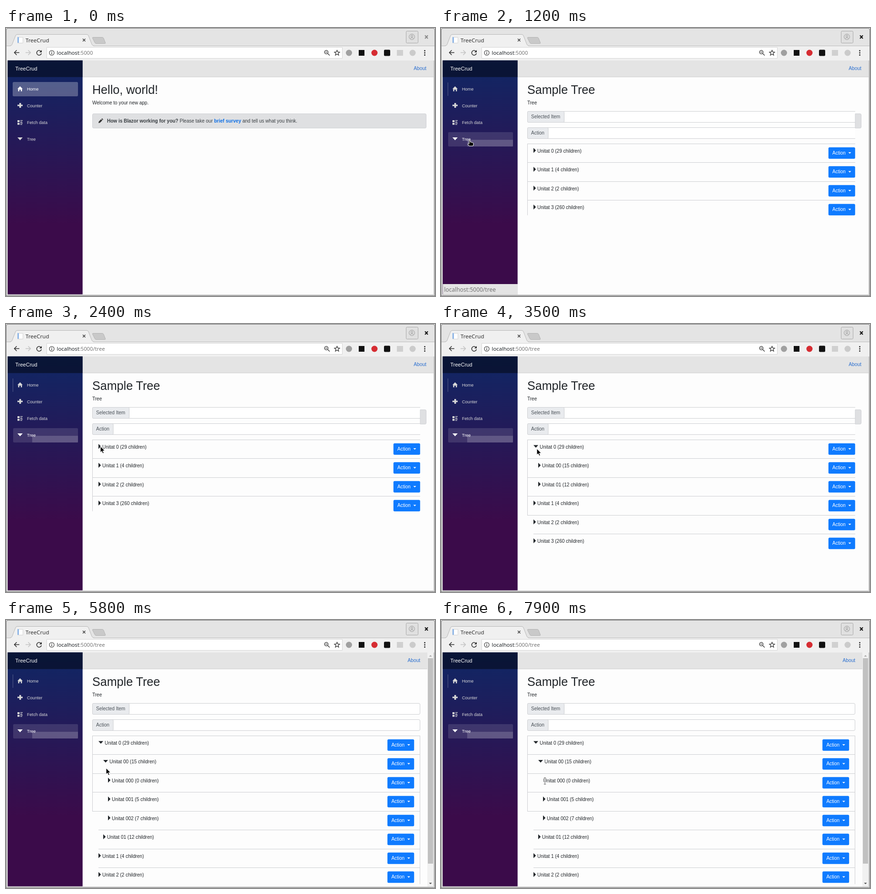
Recreate the animation shown at these times as an HTML page. Size 900 by 561 pixels, loop 8 s.

```html
<!DOCTYPE html>
<html lang="en">
<head>
<meta charset="utf-8">
<title>TreeCrud</title>
<style>
  html, body { margin: 0; width: 100%; height: 100%; overflow: hidden; background: #e4e4e4; }
  svg { display: block; width: 100%; height: 100%; }
  text { font: 10px "Liberation Sans", Arial, sans-serif; fill: #212529; white-space: pre; }
  .ui { font-family: "Noto Sans", sans-serif; }
  .h1 { font-size: 25.1px; }
  .nav { font-size: 9.1px; fill: #d7d7d7; }
  .on { fill: #fff; }
  .line { fill: none; stroke: #ced0d3; }
  .icon { fill: none; stroke: #333; stroke-width: 1.5; }
</style>
</head>
<body>
<svg viewBox="0 0 900 561">
  <defs>
    <linearGradient id="night" x2="0" y2="1">
      <stop stop-color="#0f2765"/><stop offset=".7" stop-color="#3b0b4a"/>
    </linearGradient>
    <clipPath id="narrow"><path d="M161 68H869V558H161Z"/></clipPath>
    <clipPath id="wide"><path d="M161 68H897V557H161Z"/></clipPath>
  </defs>

  <!-- window frame, tab and toolbar -->
  <path fill="#e4e4e4" d="M0 0H900V561H0Z"/>
  <path fill="#f0f0f0" d="M1 37H899V68H1Z"/>
  <path stroke="#bdbdbd" d="M1 37.5H899"/>
  <path fill="#f0f0f0" stroke="#b8b8b8" d="M8 37.5Q12 37 13 34L20 16Q21 13.500 24 13.500H169Q172 13.500 173 16L180 34Q181 37 185 37.500"/>
  <path stroke="#f0f0f0" stroke-width="2" d="M10 38H183"/>
  <path fill="#c9c9c9" stroke="#b4b4b4" d="M183 19.500H202Q204 19.500 205 22L208.500 31Q209 32.500 207 32.500H189Q187 32.500 186 30L181.500 21Q181 19.500 183 19.500Z"/>
  <path fill="#fff" stroke="#d4d4d4" d="M24.500 19.500H35.500V31.500H24.500Z"/>
  <path fill="#8fb6e6" d="M24 19H27V31H24Z"/>
  <text class="ui" x="41" y="29.500" style="font-size:11.5px;fill:#333">TreeCrud</text>
  <path class="icon" style="stroke-width:1.2" d="M161 22.500L166.500 28M166.500 22.500L161 28"/>
  <rect x="839.500" y="6.500" width="25" height="25" rx="2" fill="#e0e0e0" stroke="#aaa"/>
  <g fill="none" stroke="#999"><circle cx="851.500" cy="18.500" r="5.800"/><circle cx="851.500" cy="17" r="2"/><path d="M848 22Q851.500 18.500 855 22"/></g>
  <path id="close" stroke-width="2" d="M879 15.500L885 22M885 15.500L879 22"/>

  <path class="icon" d="M28 51.500H18M22.500 46.500L17.500 51.500L22.500 56.500"/>
  <path class="icon" style="stroke:#c4c4c4" d="M41 51.500H51M46.500 46.500L51.500 51.500L46.500 56.500"/>
  <path class="icon" d="M73.500 49A5 5 0 1 0 74.300 53"/><path fill="#333" d="M75 46V51H70Z"/>
  <path fill="#fff" stroke="#d6d6d6" d="M85.500 40.500H705.500V63.500H85.500Z"/>
  <circle class="icon" cx="96" cy="52" r="5" style="stroke-width:1.1"/>
  <path class="icon" d="M96 51V55M96 48.500V50" style="stroke-width:1.3"/>
  <text class="ui" x="106.500" y="56" style="font-size:11.2px">localhost<tspan id="url" fill="#777"></tspan></text>
  <circle class="icon" cx="672" cy="50.500" r="3.700" style="stroke-width:1.3"/>
  <path class="icon" d="M675 53.500L679 57.500M670 50.500H674" style="stroke-width:1.2"/>
  <path class="icon" style="stroke-width:1.2" d="M694.500 46.500L696.100 50.200L700 50.500L697 53L698 57L694.500 54.800L691 57L692 53L689 50.500L692.900 50.200Z"/>
  <circle cx="719.500" cy="52" r="6.500" fill="#a0a0a0"/>
  <path fill="#111" d="M740 46H752V58H740Z"/>
  <circle cx="773" cy="52" r="6.500" fill="#d62c32"/>
  <rect x="793" y="45.500" width="13" height="13" rx="2" fill="#111"/>
  <path fill="#d0d0d0" d="M820 46H833V58H820Z"/>
  <circle cx="853" cy="52" r="6.500" fill="#cbcbcb"/>
  <g fill="#333"><circle cx="878.500" cy="47.500" r="1.500"/><circle cx="878.500" cy="52" r="1.500"/><circle cx="878.500" cy="56.500" r="1.500"/></g>

  <!-- page background and sidebar -->
  <path fill="#fdfdfd" d="M160 68H897V558H160Z"/>
  <path fill="#e4e4e4" d="M160 68H897V102H160Z"/>
  <path stroke="#d2d2d2" d="M160 102.500H897"/>
  <path fill="none" stroke="#bbb" d="M3.500 68V558.500H897.500V68"/>
  <path fill="url(#night)" d="M3.600 67.700H160.700V557.600H3.600Z"/>
  <path fill="#000" fill-opacity=".46" d="M3.600 67.700H160.700V102.700H3.600Z"/>
  <text x="19.500" y="89" style="font-size:11px;fill:#fff">TreeCrud</text>
  <g id="page"></g>
  <path fill="none" stroke="#777" d="M.5 561V4Q.5 .5 4 .5H896Q899.500 .5 899.500 4V561M0 560.500H900"/>
  <g id="cursor" stroke="#fff" stroke-linejoin="round"><path/></g>
</svg>

<script>
const LOOP = 8000, STEP = 100;
const HOVER = 800, OPEN_TREE = 1100, NEW_URL = 1500, LEAVE = 2400;
const EXPAND_ROOT = 2800, EXPAND_CHILD = 4700, MARK_LEAF = 7500, TEXT_CURSOR = 7900;

const $ = id => document.getElementById(id);
const text = (x, y, content, attrs = '') => `<text x="${x}" y="${y}" ${attrs}>${content}</text>`;
const box = (x, y, w, h, attrs) => `<rect x="${x}" y="${y}" width="${w}" height="${h}" ${attrs}/>`;
const path = (d, attrs) => `<path d="${d}" ${attrs}/>`;

const NAV = [
  ['Home', 'M29.500 122L35 127.500H33.500V132.500H31V129H28V132.500H25.500V127.500H24Z'],
  ['Counter', 'M28 157H31.500V160.500H35V163.500H31.500V167H28V163.500H24V160.500H28Z'],
  ['Fetch data', 'M24 193H28.500V197H24ZM30 193H35V194.300H30ZM30 196H34V197.300H30ZM24 198.500H28.500V202.500H24ZM30 198.500H35V199.800H30ZM30 201.200H34V202.500H30Z'],
  ['Tree', 'M24 229H35L29.500 235Z']
];

function navigation(onTree) {
  const white = opacity => `fill="#fff" fill-opacity="${opacity}"`;
  const highlight = onTree
    ? box(15, 218, 136, 30, `rx="2" ${white(.12)}`) + box(55, 234, 96, 14, white(.17))
      + path('M14.500 114V142', 'stroke="#fff" stroke-opacity=".25"')
    : box(14, 113, 137, 30, `rx="2.500" ${white(.27)}`);
  return highlight + NAV.map(([label, icon], i) => {
    const active = i === (onTree ? 3 : 0) ? 'nav on' : 'nav';
    return path(icon, `class="${active}"`) + text(44, 131 + 35 * i, label, `class="${active}"`);
  }).join('');
}

function home() {
  return text(181, 137.5, 'Hello, world!', 'class="h1"')
    + text(181, 159.5, 'Welcome to your new app.')
    + box(181.5, 179.5, 700, 30, 'rx="2.500" fill="#dfe0e2" stroke="#d0d2d6"')
    + path('M194 199L194.700 195.800L199.500 191L202 193.500L197.200 198.300ZM200.300 190.200L201.600 189L204 191.400L202.800 192.700Z', 'fill="#333"')
    + text(212, 198, '<tspan font-weight="bold">How is Blazor working for you?</tspan> Please take our '
      + '<tspan font-weight="bold" fill="#0d6fe6">brief survey</tspan> and tell us what you think.', 'style="fill:#383d41"');
}

// Each row: [depth, label, state]
function treeRows(t) {
  const root = t >= EXPAND_ROOT, child = t >= EXPAND_CHILD;
  const rows = [[0, '0 (29', root ? 'open' : 'closed']];
  if (root) rows.push([1, '00 (15', child ? 'open' : 'closed']);
  if (child) rows.push([2, '000 (0', t >= MARK_LEAF ? 'leaf' : 'closed'], [2, '001 (5'], [2, '002 (7']);
  if (root) rows.push([1, '01 (12']);
  rows.push([0, '1 (4'], [0, '2 (2']);
  if (!child) rows.push([0, '3 (260']);
  return rows;
}

function row([depth, label, state = 'closed'], i, buttonX) {
  const y = 242 + 39.5 * i, x = 194 + 10 * depth, top = Math.floor(y) + .5;
  const marker = {
    open: `M${x} ${y + 11.5}h10l-5 5.500z`,
    closed: `M${x} ${y + 9}l5.200 5.200l-5.200 5.200z`,
    leaf: ''
  }[state];
  const indent = { open: 13, closed: 8, leaf: .5 }[state];
  return path(`M${i < 5 ? 181 : 194} ${top}H869`, 'class="line"')
    + path(marker, 'fill="#212529"')
    + text(x + indent, y + 18.5, `Unitat ${label} children)`)
    + box(buttonX, y + 7.7, 56, 24, 'rx="2.500" fill="#0f7bff"')
    + text(buttonX + 8.2, y + 22.8, 'Action', 'style="fill:#fff"')
    + path(`M${buttonX + 41.7} ${y + 18}h6l-3 3z`, 'fill="#fff"');
}

function field(y, labelWidth, label, width) {
  return box(181.5, y, width, 23, 'rx="2.500" fill="#fff" stroke="#ced0d3"')
    + box(181.5, y, labelWidth, 23, 'rx="2" fill="#e9ebee" stroke="#ced0d3"')
    + text(189, y + 14.7, label, 'style="fill:#495057"');
}

function scrollbar() {
  return box(884, 68, 13, 490, 'fill="#f1f1f1"') + box(885, 80, 11, 430, 'fill="#c1c1c1"')
    + path('M887.500 76.500h6l-3-3z', 'fill="#a3a3a3"') + path('M887.500 550h6l-3 3z', 'fill="#505050"');
}

function tree(t) {
  const scrolls = t >= EXPAND_CHILD, rows = treeRows(t);
  const width = scrolls ? 687 : 700;
  const bottom = t < EXPAND_ROOT ? 392 : 400;
  return `<g clip-path="url(#${scrolls ? 'wide' : 'narrow'})">`
    + text(181, 137.5, 'Sample Tree', 'class="h1"') + text(181, 159.5, 'Tree')
    + field(174.5, 77, 'Selected Item', width) + field(208.5, 43.5, 'Action', width)
    + path(`M181.500 242V${bottom}`, 'class="line"')
    + rows.map((r, i) => row(r, i, scrolls ? 800.2 : 812.8)).join('')
    + (scrolls ? path('M868.500 242V553', 'class="line"') : '') + '</g>'
    + (scrolls ? scrollbar() : path('M869 179.500H879Q881.500 179.500 881.500 182V207Q881.500 209.500 879 209.500H869Z', 'fill="#dfe0e2" stroke="#d0d2d6"'));
}

function page(t) {
  const onTree = t >= OPEN_TREE;
  const status = t >= HOVER && t < LEAVE
    ? box(4, 536, 157, 22, 'fill="#e4e4e4"') + text(6.5, 552, 'localhost:5000/tree', 'class="ui" style="font-size:12px;fill:#757575"')
    : '';
  return navigation(onTree) + text(t < EXPAND_CHILD ? 855.3 : 842.5, 88, 'About', 'style="fill:#2a6fd0;font-size:10.2px"')
    + (onTree ? tree(t) : home()) + status;
}

const SHAPES = {
  arrow: 'M0 0V13L3 10.300L5 15L7.300 14L5.300 9.500H9.300Z',
  hand: 'M-1 1Q0-.5 1.200 1V5Q3 4 4 5.500Q5.500 5 6.300 6.300Q8 6 8 7.500V10L7 13H-1L-4 8.500Q-3.500 6.500-1 8.500Z',
  beam: 'M-3-6.500H-.8L0-6L.8-6.500H3V-5H.8V7H3V8.500H.8L0 8L-.8 8.500H-3V7H-.8V-5H-3Z'
};
// Pointer waypoints: time, x, y
const PATH = [
  [300, 2, 330], [800, 58, 240], [900, 60, 234], [1400, 60, 234], [2100, 190, 252], [2200, 198, 256],
  [3400, 198, 256], [3500, 201, 261], [4300, 206, 295], [4400, 207, 297], [5700, 207, 297],
  [5800, 210, 310], [6300, 220, 367], [6600, 221, 352], [7200, 216, 336], [7800, 216, 336], [7900, 218, 335.5]
];

function pointerAt(t) {
  const next = PATH.findIndex(p => p[0] > t);
  if (next < 0) return PATH[PATH.length - 1].slice(1);
  const [t0, x0, y0] = PATH[next - 1], [t1, x1, y1] = PATH[next];
  const k = (t - t0) / (t1 - t0);
  return [x0 + (x1 - x0) * k, y0 + (y1 - y0) * k];
}

function drawCursor(t) {
  const cursor = $('cursor'), visible = t >= PATH[0][0];
  cursor.setAttribute('visibility', visible ? 'visible' : 'hidden');
  if (!visible) return;
  const shape = t >= TEXT_CURSOR ? 'beam' : t >= HOVER && t < 2000 ? 'hand' : 'arrow';
  cursor.setAttribute('transform', `translate(${pointerAt(t).map(Math.round)})`);
  cursor.firstElementChild.setAttribute('d', SHAPES[shape]);
}

let shown = -1;
function frame(now) {
  const t = Math.floor(now % LOOP / STEP) * STEP;
  if (t !== shown) {
    shown = t;
    $('close').setAttribute('stroke', t < 300 ? '#888' : '#111');
    $('url').textContent = t < NEW_URL ? ':5000' : ':5000/tree';
    $('page').innerHTML = page(t);
    drawCursor(t);
  }
  requestAnimationFrame(frame);
}
frame(performance.now());
</script>
</body>
</html>
```
